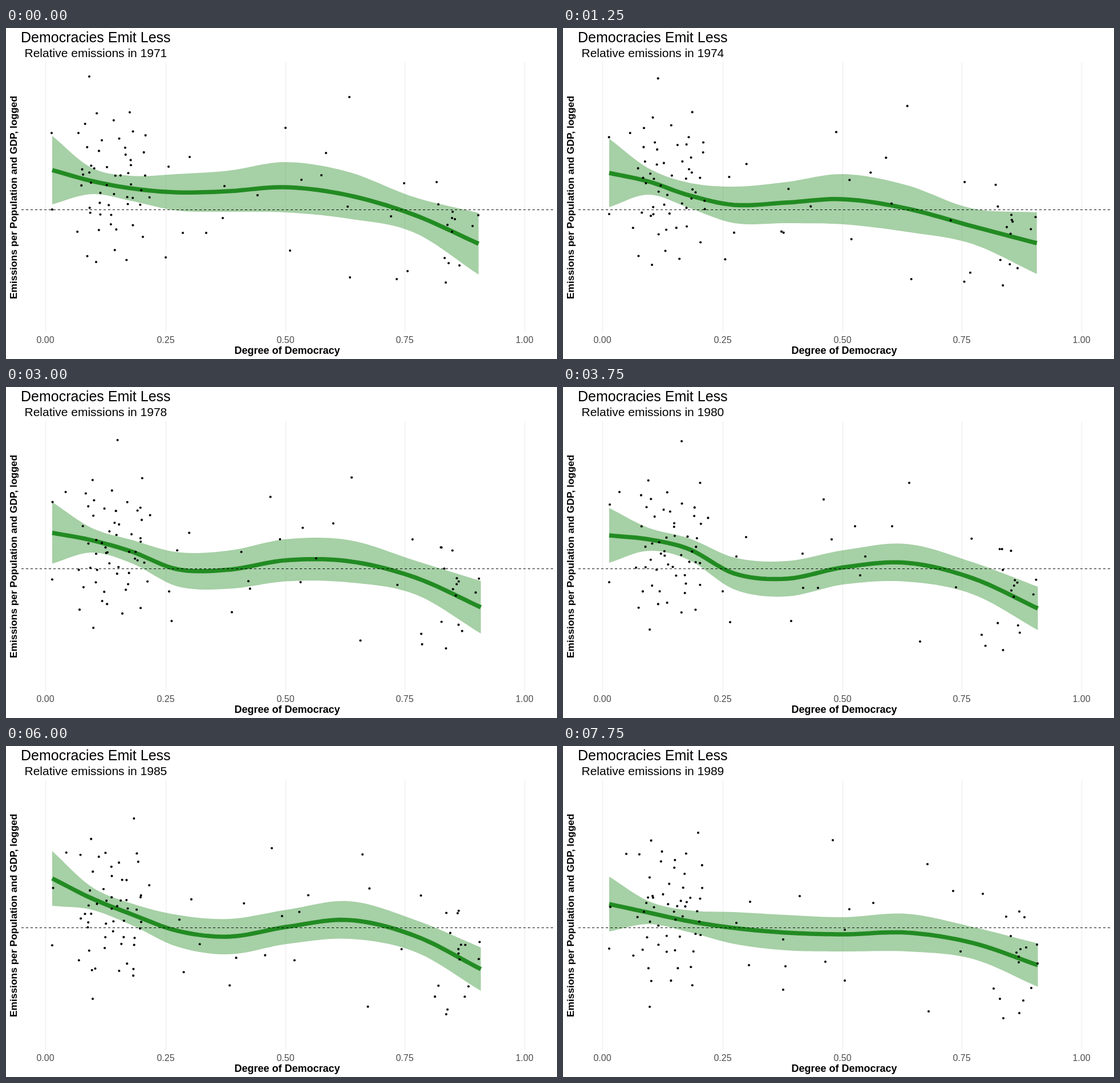
Recreate the animation shown at these times as an HTML page with a canvas. Size 966 by 580 pixels, loop 8000 ms.

```html
<!DOCTYPE html>
<html lang="en">
<head>
<meta charset="utf-8">
<title>Democracies Emit Less</title>
<style>
html, body { margin: 0; width: 100%; height: 100%; overflow: hidden; background: #fff; }
canvas { display: block; }
</style>
</head>
<body>
<canvas id="stage" width="966" height="580"></canvas>
<script>
const ctx = document.getElementById('stage').getContext('2d');
const STEP_MS = 250, STEPS = 32, LAST = STEPS - 1;
const FONT = '"Liberation Sans", Arial, sans-serif';

// Height of the trend at a few x stops, one row per key step.
const STOPS = [81, 150, 220, 300, 390, 490, 600, 715, 829];
const KEY_STEPS = [0, 5, 9, 15, 19, 24, 31];
const TREND = [
  [249, 268, 281, 288, 286, 279, 293, 327, 378],
  [254, 269, 293, 310, 306, 300, 316, 347, 377],
  [251, 270, 293, 312, 304, 291, 303, 333, 384],
  [260, 267, 284, 327, 336, 316, 308, 335, 388],
  [255, 272, 291, 310, 312, 304, 304, 334, 388],
  [232, 267, 295, 324, 334, 317, 305, 333, 391],
  [277, 292, 307, 319, 327, 330, 327, 345, 384]
];
// Half-width of the confidence band, before and after it tightens.
const WIDE = [60, 23, 22, 32, 36, 44, 41, 31, 54];
const TIGHT = [48, 20, 19, 28, 31, 30, 33, 28, 38];

// Isolated dots: x, y at the start, midway and at the end.
const WANDERERS = [
  [146,85, 208,95, 237,152], [80,184, 82,206, 83,282], [81,318, 81,342, 81,355],
  [127,184, 99,184, 111,189], [158,410, 152,425, 152,457], [285,243, 304,297, 304,310],
  [322,226, 321,263, 328,273], [280,402, 293,412, 326,384], [310,359, 280,358, 386,339],
  [351,359, 447,352, 460,378], [380,333, 400,410, 386,427], [383,277, 420,292, 415,263],
  [441,293, 421,352, 390,386], [490,175, 457,197, 473,165], [518,266, 471,267, 494,322],
  [553,258, 512,244, 544,275], [561,219, 577,244, 684,254], [602,121, 607,168, 639,207],
  [599,313, 530,297, 502,286], [498,390, 521,330, 494,411], [603,437, 626,446, 641,465],
  [675,330, 689,351, 697,360]
];
// Democracies drift evenly: x, y at the start and at the end.
const DEMOCRACIES = [
  [698,272, 736,259], [755,270, 777,299], [758,309, 785,333], [783,322, 802,356],
  [782,333, 812,353], [787,335, 795,362], [774,345, 799,369], [782,357, 799,379],
  [818,347, 832,381], [828,328, 831,348], [769,403, 755,425], [776,412, 821,424],
  [795,416, 807,446], [771,446, 772,477], [704,426, 766,443], [685,440, 800,468]
];

const mix = (a, b, u) => a + (b - a) * u;
const mixAll = (a, b, u) => a.map((v, i) => mix(v, b[i], u));
const clamp = u => Math.min(1, Math.max(0, u));

function seeded(seed) {
  return () => {
    seed = (seed * 1664525 + 1013904223) >>> 0;
    return seed / 4294967296;
  };
}

// Autocracies: a dense cloud, thickest in the middle, sinking a little over time.
const random = seeded(1971);
const COUNT = 52;
const CLOUD = Array.from({ length: COUNT }, (_, i) => {
  const spread = 2 * (i + 0.5) / COUNT - 1;
  return {
    x: 130 + 118 * ((i * 0.618 + 0.2) % 1),
    y: 272 + 75 * spread + 52 * spread ** 3,
    phase: random() * 6.3,
    swing: 5 + random() * 9,
    speed: 0.1 + random() * 0.15
  };
});

// Index of the segment holding t, and the share of it already passed.
function segment(times, t) {
  let i = 0;
  while (i < times.length - 2 && t >= times[i + 1]) i++;
  return [i, (t - times[i]) / (times[i + 1] - times[i])];
}

// Smooth curve through the stops, at x.
function curve(ys, x) {
  const slope = i => {
    const a = Math.max(i - 1, 0), b = Math.min(i + 1, ys.length - 1);
    return (ys[b] - ys[a]) / (STOPS[b] - STOPS[a]);
  };
  const [i, u] = segment(STOPS, x), w = STOPS[i + 1] - STOPS[i];
  const u2 = u * u, u3 = u2 * u;
  return ys[i] * (2 * u3 - 3 * u2 + 1) + ys[i + 1] * (3 * u2 - 2 * u3)
    + slope(i) * w * (u3 - 2 * u2 + u) + slope(i + 1) * w * (u3 - u2);
}

function line(x1, y1, x2, y2, color, dash = []) {
  ctx.strokeStyle = color;
  ctx.lineWidth = 1;
  ctx.setLineDash(dash);
  ctx.beginPath();
  ctx.moveTo(x1, y1);
  ctx.lineTo(x2, y2);
  ctx.stroke();
  ctx.setLineDash([]);
}

function label(text, x, y, size, { weight = '', align = 'left', color = '#000' } = {}) {
  ctx.font = `${weight} ${size}px ${FONT}`;
  ctx.textAlign = align;
  ctx.fillStyle = color;
  ctx.fillText(text, x, y);
}

function dot(x, y) {
  ctx.beginPath();
  ctx.arc(x, y, 2.05, 0, Math.PI * 2);
  ctx.fill();
}

function drawTrend(step) {
  const [k, u] = segment(KEY_STEPS, step);
  const mid = mixAll(TREND[k], TREND[k + 1], u);
  const half = mixAll(WIDE, TIGHT, clamp((step - 9) / 6));
  const right = mix(828.5, 832.5, clamp(step / 9));
  const shares = Array.from({ length: 80 }, (_, i) => i / 79);
  const trace = (ys, along) => along.forEach(s =>
    ctx.lineTo(mix(81, right, s), curve(ys, mix(81, 829, s))));

  ctx.fillStyle = 'rgba(34,139,34,0.4)';
  ctx.beginPath();
  trace(mid.map((y, i) => y - half[i]), shares);
  trace(mid.map((y, i) => y + half[i]), [...shares].reverse());
  ctx.fill();

  ctx.strokeStyle = '#228b22';
  ctx.lineWidth = 7.5;
  ctx.beginPath();
  trace(mid, shares);
  ctx.stroke();
}

function drawDots(step) {
  ctx.fillStyle = '#000';
  for (const c of CLOUD) {
    const angle = c.phase + c.speed * step;
    dot(c.x + c.swing * Math.cos(angle), c.y + c.swing * Math.sin(angle) + step * 0.7);
  }
  const [half, u] = segment([0, 15, LAST], step);
  for (const path of WANDERERS) {
    const [x1, y1, x2, y2] = path.slice(half * 2);
    dot(mix(x1, x2, u), mix(y1, y2, u));
  }
  const share = step / LAST;
  for (const [x1, y1, x2, y2] of DEMOCRACIES) dot(mix(x1, x2, share), mix(y1, y2, share));
  if (step >= 9) {
    const joined = (step - 9) / (LAST - 9);
    dot(mix(755, 809, joined), mix(278, 300, joined));
    dot(mix(780, 800, joined), mix(286, 290, joined));
  }
}

function draw(step) {
  ctx.fillStyle = '#fff';
  ctx.fillRect(0, 0, 966, 580);
  [69.5, 280.5, 490.5, 699.5, 909.5].forEach((x, i) => {
    line(x, 60, x, 533, '#ebebeb');
    label((i / 4).toFixed(2), x - 0.5, 552, 16, { align: 'center', color: '#4d4d4d' });
  });

  drawTrend(step);
  drawDots(step);
  line(27, 318.5, 959, 318.5, '#000', [4, 4]);

  const year = Math.round(1971 + step * 18 / LAST);
  label('Democracies Emit Less', 26, 25, 25);
  label('Relative emissions in ' + year, 32.5, 51, 21);
  label('Degree of Democracy', 493, 571, 18, { weight: 'bold', align: 'center' });
  ctx.save();
  ctx.translate(19, 297);
  ctx.rotate(-Math.PI / 2);
  label('Emissions per Population and GDP, logged', 0, 0, 17.4, { weight: 'bold', align: 'center' });
  ctx.restore();
}

const start = performance.now();
function tick() {
  draw(Math.floor((performance.now() - start) / STEP_MS) % STEPS);
  requestAnimationFrame(tick);
}
tick();
</script>
</body>
</html>
```
